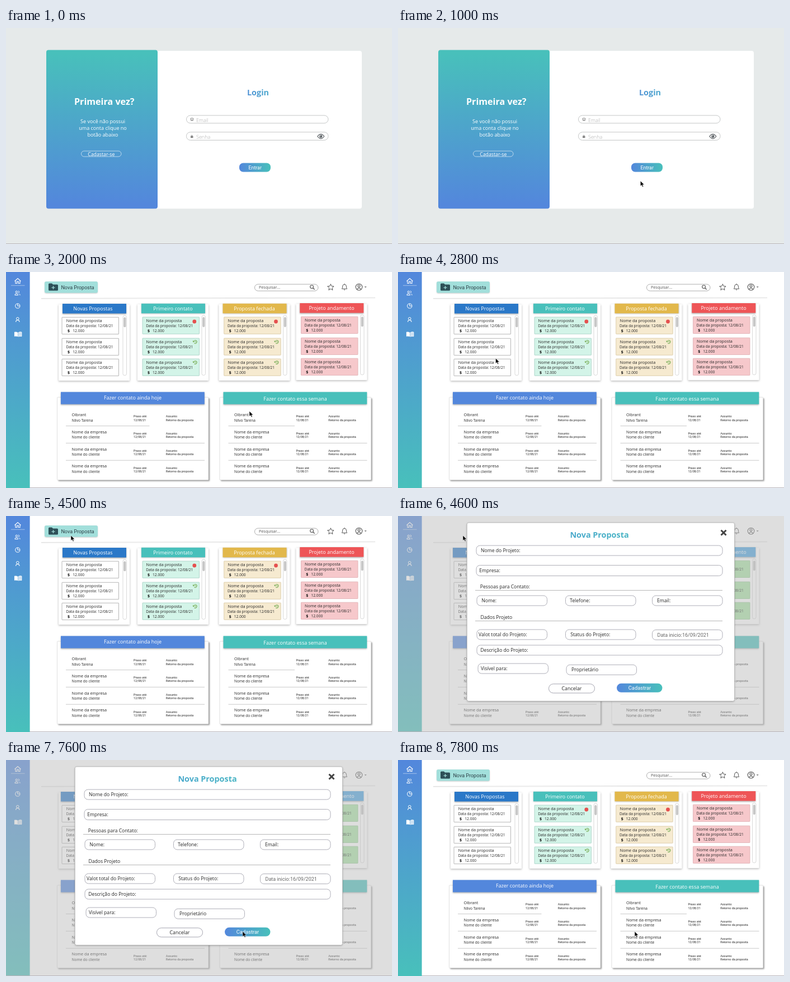
Animation of 690 by 388 pixels, one loop 8000 ms. Source, as an HTML page with a canvas:

```html
<!DOCTYPE html>
<html lang="pt">
<head>
<meta charset="utf-8">
<title>Nova Proposta</title>
<style>
html, body { margin: 0; width: 100%; height: 100%; overflow: hidden; background: #fff; }
canvas { display: block; width: 690px; height: 388px; }
</style>
</head>
<body>
<canvas id="stage" width="690" height="388"></canvas>
<script>
const ctx = document.getElementById('stage').getContext('2d');
const BLUE = '#5387dc', TEAL = '#48c0bb', INK = '#262626';
const SANS = '"Open Sans", "Noto Sans", sans-serif';
const ROBOTO = 'Roboto, Arial, sans-serif';
const LOOP = 8000;

// Pointer way points: time, x, y
const PATH = [
  [500, 634, 120], [800, 540, 300], [1100, 380, 262], [1300, 433, 249], [1500, 435, 250],
  [2200, 435, 250], [2400, 200, 90], [2600, 46, 40], [2800, 174.5, 155], [2950, 420, 342],
  [3100, 588, 330], [3200, 566, 272], [3600, 310, 130], [4000, 119, 33], [4200, 116, 35],
  [4800, 116, 35], [5000, 115, 36], [5100, 115, 36], [5500, 220, 130], [6000, 365, 222],
  [6200, 390, 204], [6500, 456, 318], [6900, 428, 312], [7200, 423, 308], [8000, 423, 308]
];

function gradient(x0, y0, x1, y1, from, to) {
  const g = ctx.createLinearGradient(x0, y0, x1, y1);
  g.addColorStop(0, from);
  g.addColorStop(1, to);
  return g;
}

function box(x, y, r, b, radius, fill, stroke, width = 0.8) {
  ctx.beginPath();
  ctx.roundRect(x, y, r - x, b - y, radius);
  if (fill) { ctx.fillStyle = fill; ctx.fill(); }
  if (stroke) { ctx.strokeStyle = stroke; ctx.lineWidth = width; ctx.stroke(); }
}

function shadowBox(x, y, r, b, radius, fill, dx, dy, blur, alpha) {
  ctx.save();
  ctx.shadowColor = `rgba(0,0,0,${alpha})`;
  ctx.shadowOffsetX = dx;
  ctx.shadowOffsetY = dy;
  ctx.shadowBlur = blur;
  box(x, y, r, b, radius, fill);
  ctx.restore();
}

function text(str, x, y, size, color = INK, { font = SANS, weight = 400, align = 'left' } = {}) {
  ctx.font = `${weight} ${size}px ${font}`;
  ctx.textAlign = align;
  ctx.fillStyle = color;
  ctx.fillText(str, x, y);
}

function line(points, color, width = 1, close = false) {
  ctx.beginPath();
  points.forEach(([x, y]) => ctx.lineTo(x, y));
  if (close) ctx.closePath();
  ctx.strokeStyle = color;
  ctx.lineWidth = width;
  ctx.stroke();
}

function arc(x, y, r, color, width, from = 0, to = Math.PI * 2) {
  ctx.beginPath();
  ctx.arc(x, y, r, from, to);
  ctx.strokeStyle = color;
  ctx.lineWidth = width;
  ctx.stroke();
}

function dot(x, y, r, color) {
  ctx.beginPath();
  ctx.arc(x, y, r, 0, Math.PI * 2);
  ctx.fillStyle = color;
  ctx.fill();
}

function shape(d, x, y, fill, stroke, width = 1) {
  ctx.save();
  ctx.translate(x, y);
  const p = new Path2D(d);
  if (fill) { ctx.fillStyle = fill; ctx.fill(p); }
  if (stroke) { ctx.strokeStyle = stroke; ctx.lineWidth = width; ctx.stroke(p); }
  ctx.restore();
}

function background(color) {
  ctx.fillStyle = color;
  ctx.fillRect(0, 0, 690, 388);
}

function bottomEdge() {
  ctx.fillStyle = '#b9b5ba';
  ctx.fillRect(0, 387, 690, 1);
}

function login() {
  background('#e6eaea');
  box(262, 41, 636, 324.5, 4, '#fff');
  box(72, 39.5, 271, 324.5, 4, gradient(0, 46, 0, 318, TEAL, BLUE));

  const mid = { align: 'center' };
  text('Primeira vez?', 175.7, 138, 16.1, '#fff', { weight: 700, align: 'center' });
  text('Se você não possui', 173, 171, 9.05, '#fff', mid);
  text('uma conta clique no', 173, 183, 9.05, '#fff', mid);
  text('botão abaixo', 173, 195, 9.05, '#fff', mid);
  box(134.5, 221, 206, 231, 5, null, 'rgba(255,255,255,.75)');
  text('Cadastar-se', 170.3, 230, 8.75, '#fff', mid);

  text('Login', 450.5, 120.5, 14.4, gradient(431, 0, 470, 0, '#5193d6', '#4ba8cd'), { weight: 700, align: 'center' });
  box(322.5, 157, 576, 171, 7, '#fff', '#b5b8b8');
  box(322.5, 187, 576, 201.5, 7, '#fff', '#b5b8b8');
  text('Email', 340, 168.8, 8.9, '#a9a9a9', { weight: 300 });
  text('Senha', 340, 199, 9, '#a9a9a9', { weight: 300 });

  box(330, 162, 334.8, 165, 0.5, null, '#777', 0.9);
  line([[330, 166.3], [335, 166.3]], '#777', 0.8);
  box(330, 194.3, 334.5, 197.3, 0.5, '#777');
  arc(332.2, 194, 1.3, '#777', 0.8, Math.PI, 0);

  shape('M-6 0Q0 -8 6 0Q0 8 -6 0Z', 562.8, 194.6, null, '#5f6468', 1.1);
  dot(562.8, 194.6, 2.6, '#5f6468');
  dot(561.9, 193.7, 0.8, '#fff');

  box(417, 242.5, 473, 258.5, 7, gradient(417, 0, 473, 0, BLUE, TEAL));
  text('Entrar', 445.2, 253.6, 8.9, '#fff', { font: ROBOTO, align: 'center' });
  bottomEdge();
}

function sidebar() {
  ctx.fillStyle = gradient(0, 0, 0, 388, BLUE, TEAL);
  ctx.fillRect(0, 0, 42.6, 388);
  const w = '#fff';
  shape('M-5.5 .5L0 -4.5L5.5 .5M-4 0V4.5H-1.3V1H1.3V4.5H4V0', 21, 16, null, w, 1.1);
  line([[9, 24.2], [33.5, 24.2]], 'rgba(255,255,255,.6)', 0.8);
  arc(18.8, 35.8, 1.7, w, 1);
  shape('M-2.9 3.6V2.8Q-2.9 .8 0 .8T2.9 2.8V3.6Z', 18.8, 38, null, w, 1);
  shape('M0 -4Q1.8 -3.6 1.8 -2.2T0 -.4M1.8 1Q3.2 1.6 3.2 3.8', 21.8, 38, null, w, 1);
  arc(20.8, 61, 4.1, w, 1);
  line([[20.8, 56.8], [20.8, 61], [25, 61]], w, 1);
  arc(20.8, 83.8, 2.3, w, 1);
  shape('M-3.2 4.4Q-3.2 1.2 0 1.2T3.2 4.4', 20.8, 85.3, null, w, 1.1);
  shape('M-.5 -3.2Q-3 -5 -6.6 -4V4Q-3 3 -.5 4.5Z', 21.5, 111.8, w);
  shape('M.6 -3Q3 -4.8 6.4 -3.8V3.8Q3 2.8 .6 4.3Z', 21.5, 111.8, 'rgba(255,255,255,.7)', w, 0.9);
}

function toolbar(dimmed) {
  line([[63, 47.4], [660, 46]], '#dcdcdc', 1);
  line([[63, 48.4], [660, 47]], '#f0f0f0', 1);
  if (!dimmed) {
    shadowBox(69, 17, 164, 37.5, 3, '#a2dfdb', 0, 1, 2, 0.2);
    shape('M0 1.5Q0 0 1.5 0H6L8 2.2H15.5Q17 2.2 17 3.7V11.5Q17 13 15.5 13H1.5Q0 13 0 11.5Z', 76, 20.4, '#2d4f57');
    line([[84.5, 25], [84.5, 31]], '#a2dfdb', 1.2);
    line([[81.5, 28], [87.5, 28]], '#a2dfdb', 1.2);
    text('Nova Proposta', 98.4, 31, 9, '#2d4147', { font: ROBOTO });
    box(444.5, 22, 558, 34, 6, '#fff', '#9a9a9a');
    text('Pesquisar...', 452, 30.4, 7.1, '#555');
    arc(546.6, 26.6, 2.9, '#555', 1.1);
    line([[548.8, 28.8], [551.6, 31.4]], '#555', 1.4);
  }
  const star = Array.from({ length: 10 }, (_, i) => {
    const a = i * Math.PI / 5 - Math.PI / 2, r = i % 2 ? 2.8 : 6;
    return [580.4 + r * Math.cos(a), 27.6 + r * Math.sin(a)];
  });
  line(star, '#555', 1, true);
  shape('M-4.6 3.2Q-3.4 2 -3.4 -1Q-3.4 -4.6 0 -5Q3.4 -4.6 3.4 -1Q3.4 2 4.6 3.2ZM-1.2 5H1.2M0 -5V-6', 605, 27, null, '#555', 1);
  arc(631, 27, 5.8, '#555', 1.1);
  arc(631, 25.3, 2, '#555', 1.1);
  shape('M-3.8 4Q0 -.4 3.8 4', 631, 27.2, null, '#555', 1.1);
  shape('M-2 -1H2L0 1.2Z', 642.7, 27, '#777');
}

function history(x, y) {
  arc(x + 0.3, y, 2.8, '#7bb05a', 1.1, -2.7, 2.3);
  shape('M-4 -2.8V.3H-.9Z', x, y, '#7bb05a');
  line([[x + 0.3, y - 1.6], [x + 0.3, y + 0.2], [x + 1.6, y + 0.9]], '#7bb05a', 0.9);
}

function column(title, titleX, x, headX, itemX, textX, y, head, fill, stroke, marks) {
  shadowBox(x, y + 2, x + 127, y + 139, 1, '#fff', 0, 1.2, 3.5, 0.3);
  shadowBox(headX, y + 0.7, headX + 114, y + 18.3, 0, head, 0, 1, 2.5, 0.3);
  text(title, titleX, y + 12.8, 9, '#fff', { align: 'center' });
  [25, 63, 100].forEach((dy, i) => {
    const top = y + dy;
    box(itemX, top, itemX + 101.5, top + 30.3, 0.5, fill, stroke);
    text('Nome da proposta', textX, top + 8.8, 7.3, INK, { weight: 500 });
    text('Data da proposta: 12/08/21', textX - 0.4, top + 18, 6.58);
    text('$', textX + 2.3, top + 27.1, 7, '#111', { weight: 700 });
    text('12.000', textX + 11.4, top + 27.1, 6.7);
    if (!marks) return;
    if (i) history(itemX + 94, top + 6.6);
    else dot(itemX + 92.8, top + 8, 3.4, '#e5504f');
  });
  const bar = x + 115;
  box(bar, y + 22, bar + 6.5, y + 129.5, 3, '#fff', '#d0d0d0');
  box(bar + 1.2, y + 25, bar + 5.4, y + 43, 2, '#c6c6c6');
}

function agenda(title, x, head, titleY, shortEnd) {
  shadowBox(x, 225, x + 270.5, 373.5, 1, '#fff', 2, 2, 2.5, 0.42);
  box(x, 225, x + 270.5, 373.5, 1, '#fff', '#cfcfcf', 0.6);
  shadowBox(x + 6.5, 215.5, x + 263.3, 237.6, 0, head, 0, 1, 2.5, 0.3);
  text(title, x + 135, titleY, 9, '#fff', { align: 'center' });
  const small = { font: ROBOTO };
  for (let i = 0; i < 4; i++) {
    const y = 258.7 + i * 30.9;
    text(i ? 'Nome da empresa' : 'Olbrant', x + 26, y, 7.25);
    text(i ? 'Nome do cliente' : 'Nilvo Tarena', x + 26, y + 9.8, 6.55);
    text('Praso até:', x + 136.5, y + 2.2, 5.4, INK, small);
    text('12/08/21', x + 136.5, y + 8.8, 5.3, INK, small);
    text('Assunto:', x + 194.3, y + 2.2, 5.4, INK, small);
    text('Retorno da proposta', x + 194.3, y + 8.8, 5.45, INK, small);
    if (i < 3) line([[x + 15.5, y + 17.8], [x + (i ? 263.5 : shortEnd), y + 17.8]], '#bdbdbd', 0.8);
  }
}

function dashboard(dimmed) {
  background('#fff');
  bottomEdge();
  sidebar();
  toolbar(dimmed);
  column('Novas Propostas', 155.3, 94, dimmed ? 98 : 101, 100, 107.8, 56.3, '#2a78c8', '#fff', '#a5a5a5');
  column('Primeiro contato', 298.5, 235, 242, 244, 250.6, 56, TEAL, '#d3f4e8', '#a5cfc3', true);
  column('Proposta fechada', 444, 380.5, 387.5, 389.7, 396.4, 56, '#e2b84b', '#f6ead0', '#d6c6a0', true);
  column('Projeto andamento', 582, 518.5, 525.3, 527.5, 534, 55.2, dimmed ? '#4aa3e0' : '#ee5557',
    dimmed ? '#a9e3a6' : '#f6c8cb', dimmed ? '#90c58e' : '#dfaeb2');
  agenda('Fazer contato ainda hoje', 91.5, BLUE, 229.3, 165);
  agenda('Fazer contato essa semana', 382, TEAL, 230.7, 134);
}

function field(label, x, y, r, textX, h = 18) {
  box(x, y, r, y + h, 6.5, '#fff', '#9b9ba6');
  text(label, textX, y + h / 2 + 3.1, 8.6);
}

function modal() {
  dashboard(true);
  background('rgba(190,190,190,.5)');
  shadowBox(123.3, 12, 601.5, 332.5, 3, '#fff', 0, 1, 3, 0.3);
  box(123.3, 12, 601.5, 332.5, 3, '#fff', '#a8a8a8', 0.7);
  text('Nova Proposta', 360, 38.6, 14.4, gradient(307, 0, 413, 0, '#4aa9cc', '#48b4c4'), { weight: 700, align: 'center' });
  line([[577.5, 25.5], [586.5, 34.5]], '#444', 3);
  line([[586.5, 25.5], [577.5, 34.5]], '#444', 3);

  field('Nome do Projeto:', 140, 53, 580, 148);
  field('Empresa:', 140, 88.5, 580, 145.3, 19);
  text('Pessoas para Contato:', 146.8, 129.8, 8.6);
  line([[138, 133.5], [580, 133.5]], '#a5a5a5', 0.8);
  field('Nome:', 141, 143, 266.5, 149.3);
  field('Telefone:', 299.5, 143, 425, 307);
  field('Email:', 454.5, 143, 580, 463);
  text('Dados Projeto', 147.5, 185.2, 8.6);
  line([[138, 188.5], [580, 188.5]], '#a5a5a5', 0.8);
  field('Valot total do Projeto:', 141, 204, 266.5, 144);
  field('Status do Projeto:', 299.5, 204, 425, 308.3);
  field('', 454.5, 204.5, 580, 463);
  text('Data inicio:16/09/2021', 463.5, 217.2, 9, '#666', { font: ROBOTO });
  field('Descrição do Projeto:', 141, 232, 580, 147.3);
  field('Visível para:', 143, 265, 268.5, 148);
  field('Proprietário', 301, 267.3, 426.5, 310);

  box(269.5, 301.7, 351.5, 318, 8, '#fff', '#8f8f9c');
  text('Cancelar', 310.5, 313.4, 8.9, INK, { align: 'center' });
  box(391, 300.8, 472.5, 316.8, 8, gradient(391, 0, 472.5, 0, BLUE, TEAL));
  text('Cadastrar', 432, 311.7, 9.3, '#fff', { font: ROBOTO, align: 'center' });
  bottomEdge();
}

function pointer(t) {
  const i = PATH.findIndex(p => p[0] > t);
  if (i < 1) return;
  const [t0, x0, y0] = PATH[i - 1], [t1, x1, y1] = PATH[i];
  const k = (t - t0) / (t1 - t0);
  shape('M0 0V9.3L2.2 7.3L3.8 10.8L5.3 10.1L3.8 6.8H6.8Z',
    x0 + (x1 - x0) * k, y0 + (y1 - y0) * k, '#000', 'rgba(255,255,255,.85)', 0.6);
}

function render(t) {
  if (t < 2000) login();
  else if (t >= 4600 && t < 7700) modal();
  else dashboard(false);
  pointer(t);
}

const start = performance.now();
let shown = -1;
function tick() {
  const t = Math.floor((performance.now() - start) % LOOP / 100) * 100;
  if (t !== shown) render(shown = t);
  requestAnimationFrame(tick);
}
tick();
</script>
</body>
</html>
```
